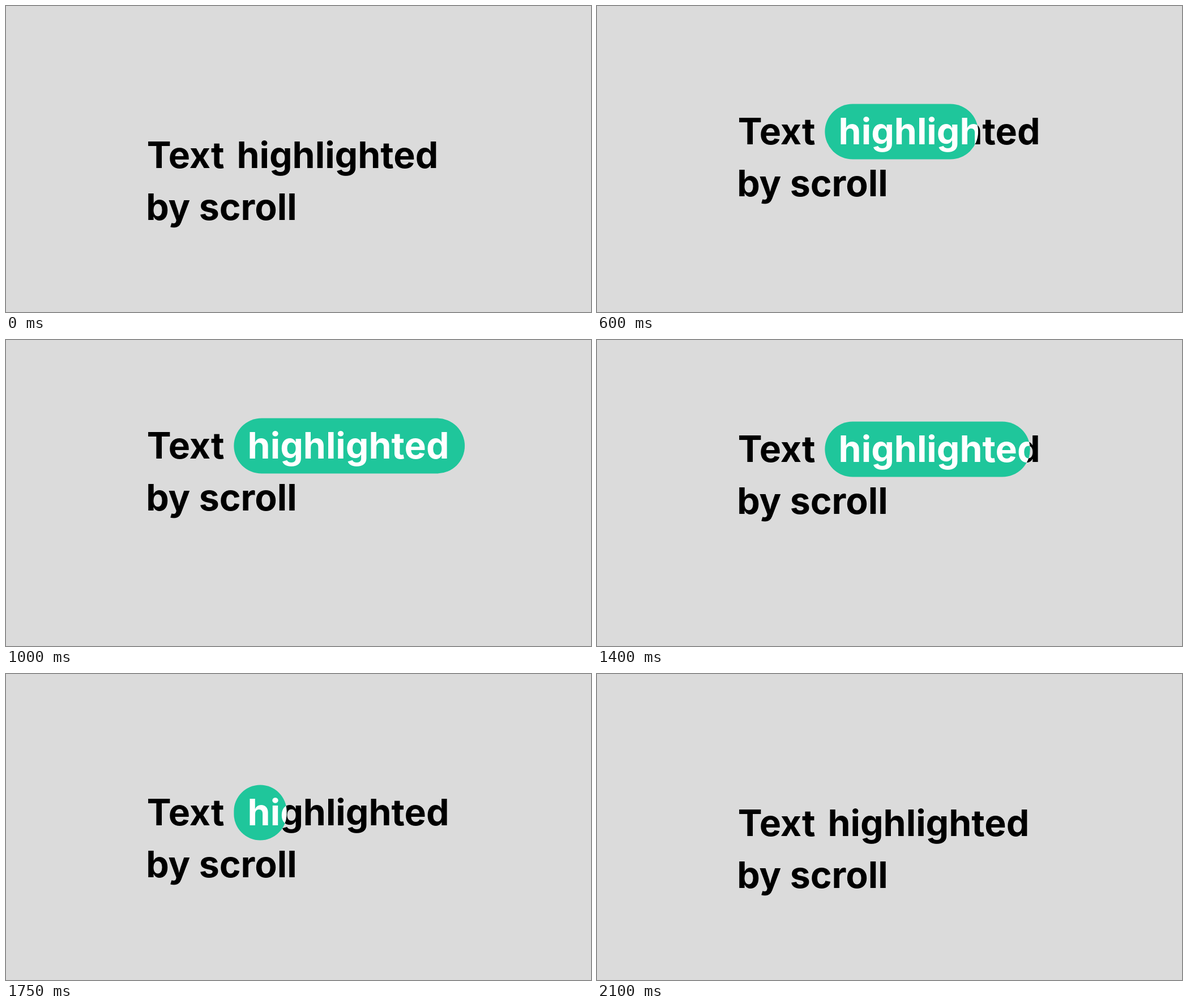
These frames come from a looping animation (1033x542 px, 2150 ms). An HTML page:

```html
<!DOCTYPE html>
<html lang="en">
<head>
<meta charset="utf-8">
<title>Text highlighted by scroll</title>
<style>
  html, body { margin: 0; width: 100%; height: 100%; overflow: hidden; background: #dbdbdb; }
  svg { display: block; width: 1033px; height: 542px; }
  text { font: bold 64.4px Inter, sans-serif; font-optical-sizing: none; }
</style>
</head>
<body>
<svg viewBox="0 0 1033 542">
  <clipPath id="clip"><rect class="pill" height="98" y="-71"/></clipPath>
  <g id="page">
    <text id="first">Text</text>
    <text id="second" y="92">by scroll</text>
    <text class="word">highlighted</text>
    <rect class="pill" height="98" y="-71" fill="#1fc69b"/>
    <g clip-path="url(#clip)"><text class="word" fill="#fff">highlighted</text></g>
  </g>
</svg>
<script>
const LOOP = 2150, STEP = 50, TURN = 1100;
const SCROLL = 77, TOP_BASELINE = 209.5;
const PILL_WIDTH = 407.7, PADDED_WIDTH = 35;

const page = document.getElementById("page");
const pills = document.querySelectorAll(".pill");
const words = document.querySelectorAll(".word");
const pen = document.createElement("canvas").getContext("2d");
pen.font = "bold 64.4px Inter, sans-serif";

// Text origin that puts the left edge of the ink at x.
const originFor = (text, x) => x + pen.measureText(text).actualBoundingBoxLeft;

const setAll = (nodes, name, value) => nodes.forEach(node => node.setAttribute(name, value));
const clamp = u => Math.min(1, Math.max(0, u));
const easeInOut = u => u < 0.5 ? 4 * u ** 3 : 1 - 4 * (1 - u) ** 3;
const progress = (t, start, duration) => easeInOut(clamp((t - start) / duration));

function along(keys, t) {
  const i = keys.findIndex(([time]) => time >= t);
  if (i === 0) return keys[0][1];
  if (i < 0) return keys[keys.length - 1][1];
  const [t0, a] = keys[i - 1], [t1, b] = keys[i];
  return a + (b - a) * (t - t0) / (t1 - t0);
}

const RETURN_PACE = [[1110, 0], [1600, 0.452], [1700, 0.548], [1900, 0.775], [2100, 1]];

const scrolled = t => t < TURN
  ? progress(t, 88, 995)
  : 1 - easeInOut(along(RETURN_PACE, t));

const highlighted = t => t < TURN
  ? progress(t, 60, 961)
  : 1 - progress(t, 1060, 1122);

function draw(t) {
  const offset = Math.round(SCROLL * (1 - scrolled(t)) * 2) / 2;
  page.setAttribute("transform", `translate(0 ${TOP_BASELINE + offset})`);

  const fullWidth = PILL_WIDTH * highlighted(t);
  const width = fullWidth < 2 ? 0 : fullWidth;
  const padding = clamp(width / PADDED_WIDTH);
  setAll(pills, "x", 405 - 2.6 * padding ** 3);
  setAll(pills, "width", width);
  setAll(pills, "rx", Math.min(49, width / 2));
  setAll(pills, "ry", Math.min(49, width / 2));
  setAll(words, "x", wordOrigin + 19.2 * padding);
}

const wordOrigin = originFor("highlighted", 411.4);
document.getElementById("first").setAttribute("x", originFor("Text", 250.7));
document.getElementById("second").setAttribute("x", originFor("by scroll", 251.2));

const begin = performance.now();
function tick() {
  const t = (performance.now() - begin) % LOOP;
  draw(Math.floor(t / STEP) * STEP);
  requestAnimationFrame(tick);
}
tick();
</script>
</body>
</html>
```
